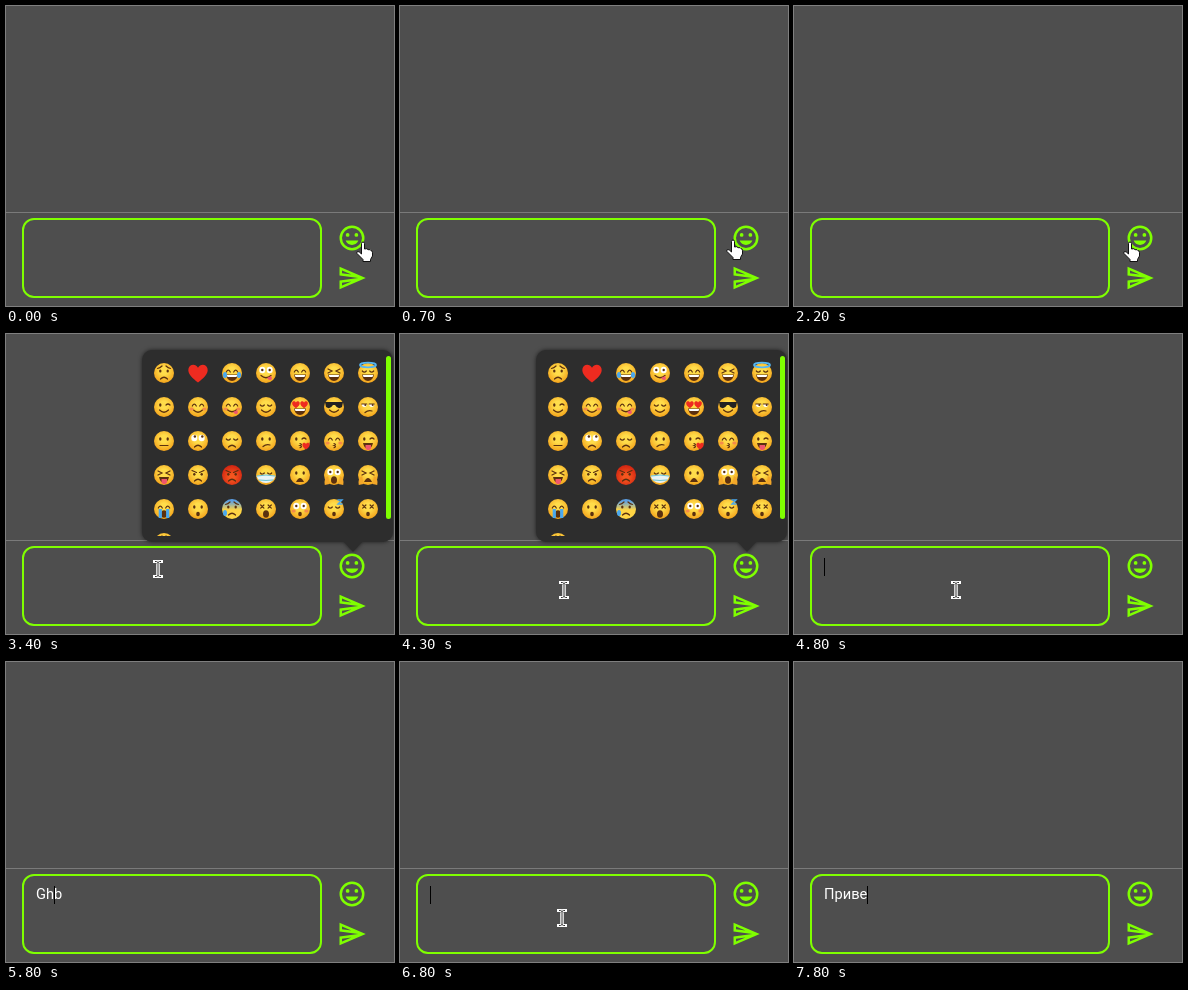
Write an HTML page that moves like this. It is 388x300 px and loops after 8000 ms.

```html
<!DOCTYPE html>
<html lang="ru">
<head>
<meta charset="utf-8">
<title>Chat input</title>
<style>
  html, body { margin: 0; width: 100%; height: 100%; overflow: hidden; background: #4e4e4e; }
  svg { display: block; width: 100vw; height: 100vh; }
  #text { font: 14.67px Roboto, sans-serif; fill: #fff; white-space: pre; }
  #popup > .panel { filter: drop-shadow(0 0 2px #0009); }
</style>
</head>
<body>
<svg viewBox="0 0 388 300">
  <defs>
    <radialGradient id="yellow" cy=".4" r=".62">
      <stop offset=".3" stop-color="#ffdc4a"/><stop offset="1" stop-color="#f3a019"/>
    </radialGradient>
    <radialGradient id="red" cy=".6" r=".62">
      <stop offset=".2" stop-color="#f4561f"/><stop offset="1" stop-color="#cf2010"/>
    </radialGradient>
    <linearGradient id="cold" x2="0" y2="1">
      <stop offset=".1" stop-color="#5c9fe4"/><stop offset=".55" stop-color="#ffd544"/>
    </linearGradient>
    <clipPath id="list"><path d="M136 22H380V202H136Z"/></clipPath>
  </defs>

  <path d="M0 206.5H388" stroke="#7a7a7a"/>
  <rect x="17" y="213" width="298" height="78" rx="11" fill="none" stroke="#7fff00" stroke-width="2"/>
  <g fill="#7fff00">
    <path transform="translate(331 217) scale(1.25)" d="M12 2a10 10 0 1 0 0 20a10 10 0 1 0 0-20zM12 20a8 8 0 1 1 0-16a8 8 0 1 1 0 16zM15.5 11a1.5 1.5 0 1 0 0-3a1.5 1.5 0 1 0 0 3zM8.5 11a1.5 1.5 0 1 0 0-3a1.5 1.5 0 1 0 0 3zM12 17.5c2.33 0 4.31-1.46 5.11-3.5H6.89c.8 2.04 2.78 3.5 5.11 3.5z"/>
    <path transform="translate(331 257) scale(1.25)" d="M4.01 6.03l7.51 3.22-7.52-1 .01-2.22m7.5 8.72L4 17.97v-2.22l7.51-1M2.01 3L2 10l15 2-15 2 .01 7L23 12 2.01 3z"/>
  </g>

  <text id="text" x="30" y="237"></text>
  <rect id="caret" y="224" width="1" height="18" fill="#000"/>

  <g id="popup">
    <path class="panel" fill="#2d2d2d" d="M146 16H377a10 10 0 0 1 10 10V198a10 10 0 0 1-10 10H356L347 218L338 208H146a10 10 0 0 1-10-10V26a10 10 0 0 1 10-10Z"/>
    <rect x="380" y="22" width="5" height="163" rx="2.5" fill="#7fff00"/>
    <g id="faces" clip-path="url(#list)"></g>
  </g>

  <path id="hand" fill="#fff" stroke="#111" stroke-linejoin="round" d="M5.5 13V2.5q0-1.5 1.5-1.5t1.5 1.5V8q3-1 3.5.7q2.5-.5 3 1q1.5-.2 1.5 2V15l-2 3.5V20.5H7V18.5L1 12.5q-1-2 1-2q1.5.3 3.5 2.5Z"/>
  <g id="beam" fill="none">
    <path id="stem" d="M-3.5-7.5H-1.5L0-6.5L1.5-7.5H3.5M0-6.5V6.5M-3.5 7.5H-1.5L0 6.5L1.5 7.5H3.5" stroke="#fff" stroke-width="3" stroke-linecap="square"/>
    <use href="#stem"/>
    <path d="M-3-7.5H-1.5L0-6.5L1.5-7.5H3M0-6.5V6.5M-3 7.5H-1.5L0 6.5L1.5 7.5H3" stroke="#333"/>
  </g>
</svg>
<script>
const $ = id => document.getElementById(id);
const DARK = '#5b300f', BLUE = '#4aa8ee', RED = '#ee2b20';

const line = (d, color = DARK, width = 1.2) =>
  `<path d="${d}" fill="none" stroke="${color}" stroke-width="${width}" stroke-linecap="round"/>`;
const area = (d, color = DARK) => `<path d="${d}" fill="${color}"/>`;
const oval = (x, y, rx, ry = rx, color = DARK) =>
  `<ellipse cx="${x}" cy="${y}" rx="${rx}" ry="${ry}" fill="${color}"/>`;
const heart = (x, y, s) =>
  `<path transform="translate(${x} ${y}) scale(${s})" fill="${RED}" d="M0 9C-5 5-10 1-9-4C-8-9-2-9 0-5C2-9 8-9 9-4C10 1 5 5 0 9Z"/>`;
const pair = draw => draw(-3.7) + draw(3.7);

const eyes = {
  o: pair(x => oval(x, -2, 1.2, 1.7)),
  n: pair(x => line(`M${x - 2}-1q2-3.6 4 0`)),
  u: pair(x => line(`M${x - 2}-2q2 2.4 4 0`)),
  O: pair(x => oval(x, -3, 3, 3.2, '#fff') + oval(x, -3, 1.2)),
  U: pair(x => oval(x, -3, 3, 3.2, '#fff') + oval(x + .6, -4.5, 1.2)),
  h: pair(x => heart(x * 1.1, -2.5, .42)),
  g: area('M-9-5H9L8 0Q4 3 1-2H-1Q-4 3-8 0Z', '#222'),
  w: oval(-3.7, -2, 1.2, 1.7) + line('M2-2q2-2 4 0'),
  x: pair(x => line(`M${x - 1.6}-4l3.2 3.2m0-3.2l-3.2 3.2`)),
  s: line('M-6-4l4 2l-4 2M6-4l-4 2l4 2'),
  a: pair(x => oval(x, -.7, 1.2, 1.4)) + line('M-6-4.5L-1.5-2.5M6-4.5L1.5-2.5'),
  p: pair(x => oval(x, -2, 1.2, 1.6)) + line('M-6.5-4.5Q-4-5-2-7M6.5-4.5Q4-5 2-7'),
  e: pair(x => area(`M${x - 2.5}-3h5q0 3-2.5 3t-2.5-3Z`, '#fff') + oval(x + 1, -2, 1) + line(`M${x - 2.5}-3h5`))
};
const mouths = {
  s: line('M-4.5 3Q0 7.5 4.5 3'),
  f: line('M-3.5 6Q0 2.5 3.5 6'),
  l: line('M-4 4.5H4'),
  d: line('M-3 5.5Q0 3 4 4'),
  D: area('M-6 1.5H6Q5 8 0 8T-6 1.5Z') + area('M-5.3 2H5.3L4.5 4H-4.5Z', '#fff'),
  c: oval(0, 5, 1.8, 2.2),
  O: oval(0, 5, 3, 3.8),
  k: line('M0 2.5q3 1 0 2q3 1 0 2.2'),
  t: area('M-5 2H5Q4 7.5 0 7.5T-5 2Z') + area('M-2.5 4H3V7.5Q0 11-2.5 7.5Z', '#f0566c'),
  y: line('M-5 2.5Q0 7 5 2.5') + area('M1 5L5 3Q7 6 4.5 7Q2.5 7.5 1 5Z', '#f0566c'),
  m: area('M-9.5 1Q0-2 9.5 1Q7 8 0 8T-9.5 1Z', '#e8f3f5') + line('M-9 1Q0-1 9 1M-7 5Q0 6 7 5', '#69c3d5', 1),
  F: area('M-4 7Q0-1 4 7Z')
};
const extras = {
  t: pair(x => oval(x * 1.9, 2, 2, 3, BLUE)),
  T: pair(x => area(`M${x - 1.6} 0h3.2V9h-3.2Z`, BLUE)),
  b: pair(x => oval(x * 1.7, 2, 2, 1.5, '#f58a4a')),
  H: '<ellipse cy="-8" rx="8" ry="2.4" fill="none" stroke="#55b6f2" stroke-width="1.8"/>',
  R: heart(6, 5, .4),
  S: oval(-7, 4, 2, 3, BLUE),
  Z: line('M4-9h4l-4 4h4', BLUE, 1.4),
  A: pair(x => area(`M${x * 2.5} 10Q${x * 2.8} 3 ${x * 1.6} 1L${x * 1.2} 9Z`, '#f3a72a'))
};

// Each face: eyes, mouth, optional extras; R = red skin, C = cold skin.
const faces = `pf ❤ nDt Oy nD sD uDH
  ws nsb nyb us hD gs ed
  ol Uf uf od wkR nkb wt
  st af af:R um oF OOA sFA
  nOT oc pfS:C xO Ocb ucZ xc
  pf`.split(/\s+/);
const skins = { R: 'red', C: 'cold' };

function drawFace(spec, i) {
  const place = `translate(${158 + i % 7 * 34} ${39 + Math.floor(i / 7) * 34})`;
  if (spec === '❤') return `<g transform="${place}">${heart(0, 0, 1.06)}</g>`;
  const [look, skin] = spec.split(':');
  const [eye, mouth, ...more] = look;
  return `<g transform="${place}"><circle r="10" fill="url(#${skins[skin] || 'yellow'})"/>` +
    eyes[eye] + mouths[mouth] + more.map(m => extras[m]).join('') + '</g>';
}
$('faces').innerHTML = faces.map(drawFace).join('');

// [time, x, y]
const handPath = [[0, 350, 235], [200, 345, 231], [400, 334, 227], [600, 322, 231], [800, 329, 235]];
const beamPath = [[3400, 152, 235], [3500, 152, 239], [3700, 152, 239], [4000, 159, 273],
  [4300, 164, 256], [4400, 162.5, 256], [4600, 161.5, 256]];
// [time, text, caret index or -1 when hidden]
const typing = [[0, '', -1], [4600, '', 0], [5100, '', -1],
  [5300, 'G', -1], [5400, 'G', 1], [5500, 'Gh', 1], [5700, 'Gh', 2], [5800, 'Ghb', 2], [5900, 'Ghb', 3],
  [6100, 'Gh', 2], [6200, 'G', 1], [6500, '', 0],
  [7000, 'П', 0], [7100, 'П', 1], [7200, 'Пр', 1], [7300, 'Пр', 2], [7400, 'При', 2],
  [7500, 'При', 3], [7600, 'Прив', 4], [7700, 'Приве', 4], [7800, 'Приве', 5]];

function along(path, t) {
  const next = path.findIndex(p => p[0] > t);
  if (next < 0) return path.at(-1).slice(1);
  const [t0, x0, y0] = path[next - 1], [t1, x1, y1] = path[next];
  const k = (t - t0) / (t1 - t0);
  return [x0 + (x1 - x0) * k, y0 + (y1 - y0) * k];
}
const show = (id, on) => $(id).setAttribute('visibility', on ? 'visible' : 'hidden');
function place(id, on, path, t) {
  show(id, on);
  if (on) $(id).setAttribute('transform', `translate(${along(path, t).map(Math.round)})`);
}

function render(now) {
  const t = Math.floor(now % 8000 / 100) * 100;
  place('hand', t < 3400, handPath, t);
  place('beam', t >= 3400 && t < 5300 || t >= 6700 && t < 7000, beamPath, t);
  show('popup', t >= 3400 && t < 4400);

  const [, text, index] = typing.findLast(step => step[0] <= t);
  $('text').textContent = text;
  show('caret', index >= 0);
  const width = index > 0 ? $('text').getSubStringLength(0, index) : 0;
  $('caret').setAttribute('x', Math.floor(30 + width));
  requestAnimationFrame(render);
}
requestAnimationFrame(render);
</script>
</body>
</html>
```
